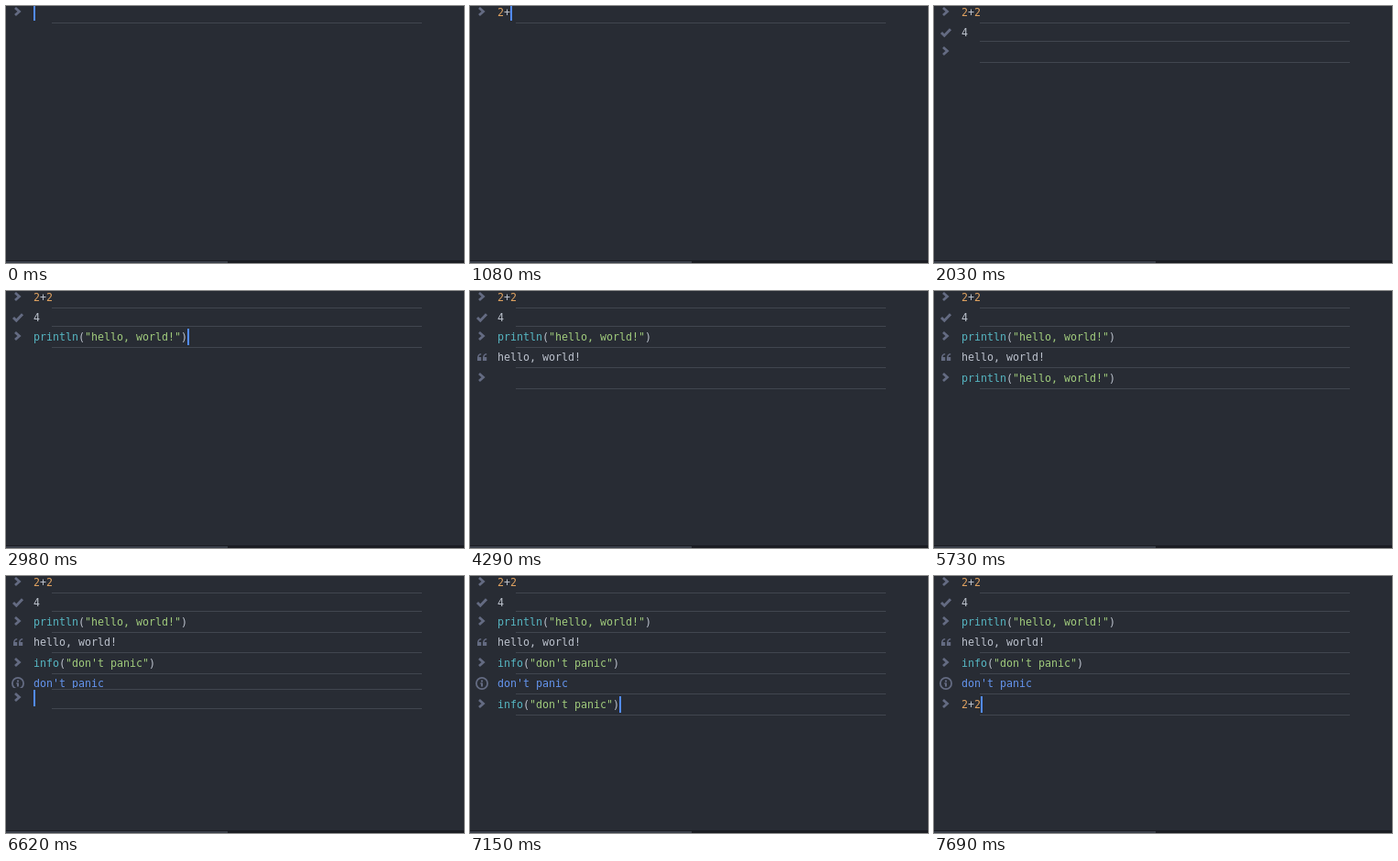
An HTML page with a canvas that plays this animation: 500 by 280 pixels, repeating every 7.99 s.

```html
<!DOCTYPE html>
<html lang="en">
<head>
<meta charset="utf-8">
<title>Console session</title>
<style>
  html, body { margin: 0; width: 100%; height: 100%; overflow: hidden; background: #282c34; }
  canvas { display: block; }
</style>
</head>
<body>
<canvas id="stage" width="500" height="280"></canvas>
<script>
const ctx = document.getElementById('stage').getContext('2d');
const LOOP = 7990, CHAR = 7, LEFT = 30;
const COLOR = {
  bg: '#282c34', line: '#41464f', icon: '#646b82', text: '#bcc2cd', number: '#dea160',
  call: '#56b6c2', string: '#a0cb7c', info: '#6494ed', cursor: '#528bff'
};
const SUM = '2+2', PRINT = 'println("hello, world!")', INFO = 'info("don\'t panic")';

// Finished commands with their results; y values are text baselines
const cells = [
  { input: SUM, output: '4', icon: check, start: 1680, y: 11, outY: 33, rule: 38 },
  { input: PRINT, output: 'hello, world!', icon: quote, start: 3870, y: 54, outY: 76, rule: 83 },
  { input: INFO, output: "don't panic", icon: info, start: 6560, y: 99, outY: 121, rule: 128, color: COLOR.info },
  { y: 144, start: Infinity }
];

// Prompt content over time: [ms, text, cursor visible]
const prompts = [
  [0, '', 1], [240, '', 0], [660, '', 1], [840, '2', 1], [1080, '2+', 1], [1320, SUM, 1],
  [1680, '', 1], [2030, '', 0], [2450, '', 1], [2630, SUM, 1], [2980, PRINT, 1], [3460, PRINT, 0],
  [3870, '', 1], [4290, '', 0], [4530, PRINT, 1], [4830, SUM, 1], [5250, PRINT, 1], [5730, PRINT, 0],
  [5790, INFO, 1], [6260, INFO, 0],
  [6560, '', 1], [6970, '', 0], [7150, INFO, 1], [7450, PRINT, 1], [7690, SUM, 1]
];

function rect(color, x, y, w, h) {
  ctx.fillStyle = color;
  ctx.fillRect(x, y, w, h);
}

function stroke(width, ...points) {
  ctx.lineWidth = width;
  ctx.beginPath();
  points.forEach(([x, y]) => ctx.lineTo(x, y));
  ctx.stroke();
}

function chevron(y) {
  stroke(2.8, [10, y - 4], [14.5, y], [10, y + 4]);
}

function check(y) {
  stroke(2.9, [8, y], [11.3, y + 3.2], [18, y - 3.8]);
}

function quote(y) {
  for (const x of [8, 14]) {
    rect(COLOR.icon, x, y, 4.2, 4);
    ctx.lineWidth = 1.5;
    ctx.beginPath();
    ctx.moveTo(x + 0.8, y + 2);
    ctx.quadraticCurveTo(x + 0.4, y - 3, x + 4.2, y - 3.3);
    ctx.stroke();
  }
}

function info(y) {
  ctx.lineWidth = 1.8;
  ctx.beginPath();
  ctx.arc(13, y, 6.1, 0, 2 * Math.PI);
  ctx.stroke();
  rect(COLOR.icon, 12, y - 3.5, 2, 2);
  rect(COLOR.icon, 12, y - 0.5, 2, 4);
  rect(COLOR.icon, 11, y - 0.5, 2, 1);
}

function text(value, x, y, color) {
  ctx.fillStyle = color;
  ctx.fillText(value, x, y);
}

function code(source, y) {
  let x = LEFT;
  for (const token of source.match(/"[^"]*"|\d|\w+|./g) || []) {
    const kind = token[0] === '"' ? 'string' : /\d/.test(token) ? 'number' : /\w/.test(token) ? 'call' : 'text';
    text(token, x, y, COLOR[kind]);
    x += CHAR * token.length;
  }
}

function rule(y) {
  rect(COLOR.line, 50, y, 404, 1);
}

function promptRow(source, y) {
  chevron(y - 5);
  code(source, y);
  rule(y + 7);
}

function result(cell, shift) {
  const bottom = cell.rule + Math.round(shift * 0.7);
  ctx.save();
  ctx.beginPath();
  ctx.rect(0, 0, 500, bottom - (shift ? 1 : 0));
  ctx.clip();
  cell.icon(cell.outY - 4);
  text(cell.output, LEFT, cell.outY, cell.color || COLOR.text);
  ctx.restore();
  rule(bottom);
}

function draw(t) {
  rect(COLOR.bg, 0, 0, 500, 280);
  rect('#1b1d23', 0, 277, 500, 3);
  rect('#3a3f49', 0, 278, 242, 2);
  ctx.font = '11.63px "DejaVu Sans Mono", monospace';
  ctx.strokeStyle = COLOR.icon;

  // A new result opens in three steps and pushes the prompt down
  let shift = 0;
  for (const cell of cells) {
    const y = cell.y + shift;
    if (t < cell.start) {
      const [, source, cursor] = prompts.findLast(p => p[0] <= t);
      promptRow(source, y);
      if (cursor) rect(COLOR.cursor, LEFT + CHAR * source.length, y - 13, 2, 18);
      break;
    }
    promptRow(cell.input, y);
    const age = t - cell.start;
    shift = age < 60 ? -16 : age < 110 ? -7 : 0;
    result(cell, shift);
  }
}

function frame() {
  draw(performance.now() % LOOP);
  requestAnimationFrame(frame);
}
frame();
</script>
</body>
</html>
```
